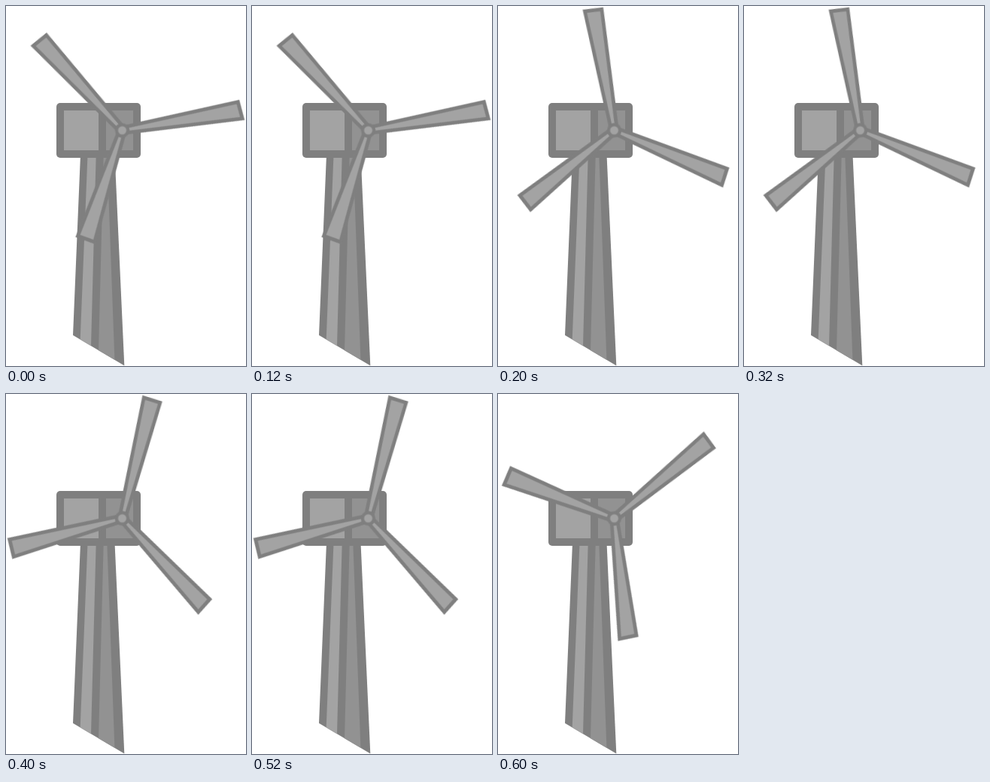
Recreate the animation shown at these times as an HTML page. Size 319 by 479 pixels, loop 800 ms.

```html
<!DOCTYPE html>
<html lang="en">
<head>
<meta charset="utf-8">
<title>Wind turbine</title>
<style>
  html, body { margin: 0; width: 100%; height: 100%; overflow: hidden; background: #fff; }
  svg { display: block; width: 100%; height: 100%; }
  .dark { fill: #7f7f7f; }
  .mid { fill: #929292; }
  .light { fill: #a3a3a3; }
  .rotor { animation: turn 800ms step-end infinite; }
  .blade { fill: #a3a3a3; stroke: #7f7f7f; stroke-width: 4.8; stroke-miterlimit: 8; }
  @keyframes turn {
    0% { transform: rotate(227.5deg); }
    25% { transform: rotate(260.1deg); }
    50% { transform: rotate(284.1deg); }
    75%, 100% { transform: rotate(320.6deg); }
  }
</style>
</head>
<body>
<svg viewBox="0 0 319 479">
  <!-- tower -->
  <path class="dark" d="M99 198H144.5L157.3 478.5L89 438Z"/>
  <path class="light" d="M108.5 198H119.7L113 452.2L98.7 443.8Z"/>
  <path class="mid" d="M129.7 198H134.3L144.4 470.8L123 458.2Z"/>

  <!-- housing -->
  <rect class="dark" x="67" y="129" width="112" height="73" rx="5"/>
  <rect class="light" x="77" y="139" width="46" height="53"/>
  <rect class="mid" x="133" y="139" width="36" height="53"/>

  <!-- rotor -->
  <g transform="translate(154.5 165.5)">
    <g class="rotor">
      <path class="blade" d="M7 -4.1L162.9 -11.3L161.6 11.3L7 4.1Z"/>
      <path class="blade" transform="rotate(122.8)" d="M7 -4.1L158 -11.4L160 11.4L7 4.1Z"/>
      <path class="blade" transform="rotate(240.7)" d="M7 -4.1L152.6 -11.4L151.9 12.2L7 4.1Z"/>
    </g>
    <circle class="dark" r="9.5"/>
    <circle class="light" r="5.5"/>
  </g>
</svg>
</body>
</html>
```
